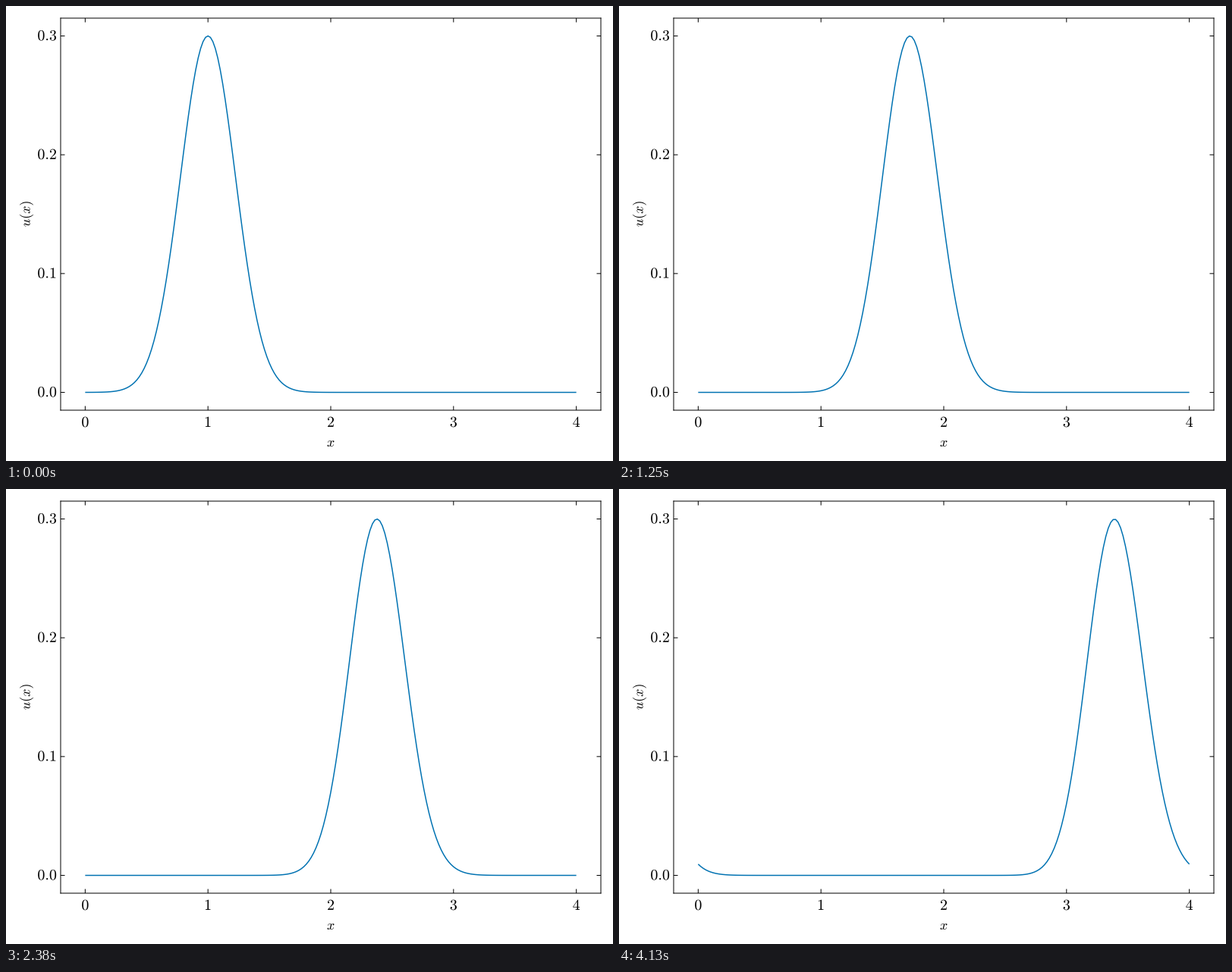
A matplotlib script for the animation above (4.18 s loop, 800x600 px).

```python
import numpy as np
import matplotlib.pyplot as plt
from matplotlib.animation import FuncAnimation
from matplotlib.patches import PathPatch
from matplotlib.textpath import TextPath
from matplotlib.transforms import Affine2D

plt.rcParams.update({"mathtext.fontset": "cm", "path.simplify": False})

W, H, DPI = 800, 600, 100
PX = 72 / DPI                      # points per pixel
LEFT, RIGHT, TOP, BOTTOM = 72, 784, 16, 533
TICK = 5.5
LOOP, INTERVAL = 4180, 20          # ms
FPS, STEPS = 24, 100
LENGTH, CELLS, TRAVEL = 4.0, 200, 2.4

fig = plt.figure(figsize=(W / DPI, H / DPI), dpi=DPI, facecolor="white")
ax = fig.add_axes([0, 0, 1, 1])
ax.set(xlim=(0, W), ylim=(H, 0))
ax.axis("off")


def to_x(x):
    margin = (RIGHT - LEFT) / 22
    return LEFT + margin + x / LENGTH * (RIGHT - LEFT - 2 * margin)


def to_y(u):
    margin = (BOTTOM - TOP) / 22
    return BOTTOM - margin - u / 0.3 * (BOTTOM - TOP - 2 * margin)


def stroke(xs, ys, color="black", width=1.0, cap="butt"):
    line, = ax.plot(xs, ys, color=color, lw=width * PX, snap=False,
                    solid_capstyle=cap, solid_joinstyle="miter")
    return line


def label(x, y, text, size, centred=True, angle=0):
    """Draw math text as outlines with (x, y) on its baseline."""
    path = TextPath((0, 0), f"${text}$", size=size)
    shift = 0
    if centred:
        box = path.get_extents()
        shift = -(box.x0 + box.x1) / 2
    place = (Affine2D().translate(shift, 0).rotate_deg(angle)
             .scale(1, -1).translate(x, y))
    ax.add_patch(PathPatch(place.transform_path(path), fc="black", lw=0,
                           snap=False))


# Axis frame, mirrored inward ticks and labels
for y in (TOP, BOTTOM):
    stroke([LEFT, RIGHT], [y, y], cap="projecting")
for x in (LEFT, RIGHT):
    stroke([x, x], [TOP, BOTTOM], cap="projecting")
for v in range(5):
    x = to_x(v)
    stroke([x, x], [BOTTOM, BOTTOM - TICK])
    stroke([x, x], [TOP, TOP + TICK])
    label(x, 555, str(v), 20)
for v in (0.0, 0.1, 0.2, 0.3):
    y = to_y(v)
    stroke([LEFT, LEFT + TICK], [y, y])
    stroke([RIGHT, RIGHT - TICK], [y, y])
    label(41.4, y + 5.8, f"{v:.1f}", 20, centred=False)
label((LEFT + RIGHT) / 2, 581, "x", 18)
label(31.5, (TOP + BOTTOM) / 2, "u(x)", 18, angle=90)

# Periodic advection with central differences, advanced exactly in time
dx = LENGTH / CELLS
grid = np.linspace(0, LENGTH, CELLS + 1)
modes = np.fft.rfft(0.3 * np.exp(-10 * (grid[:-1] - 1) ** 2))
speed = np.sin(2 * np.pi * np.fft.rfftfreq(CELLS, dx) * dx) / dx


def wave(t):
    u = np.fft.irfft(modes * np.exp(-1j * speed * t), CELLS)
    return np.append(u, u[0])


curve = stroke(to_x(grid), to_y(wave(0)), color="#0072B2", width=1.5)


def update(i):
    # The wave advances in discrete steps, 24 per second
    ms = (i + 0.7) * INTERVAL
    step = min(int(ms * FPS / 1000), STEPS - 1)
    curve.set_ydata(to_y(wave(TRAVEL * step / (STEPS - 1))))
    return curve,


anim = FuncAnimation(fig, update, frames=LOOP // INTERVAL, interval=INTERVAL,
                     repeat=True, repeat_delay=0, blit=False)
plt.show()
```
